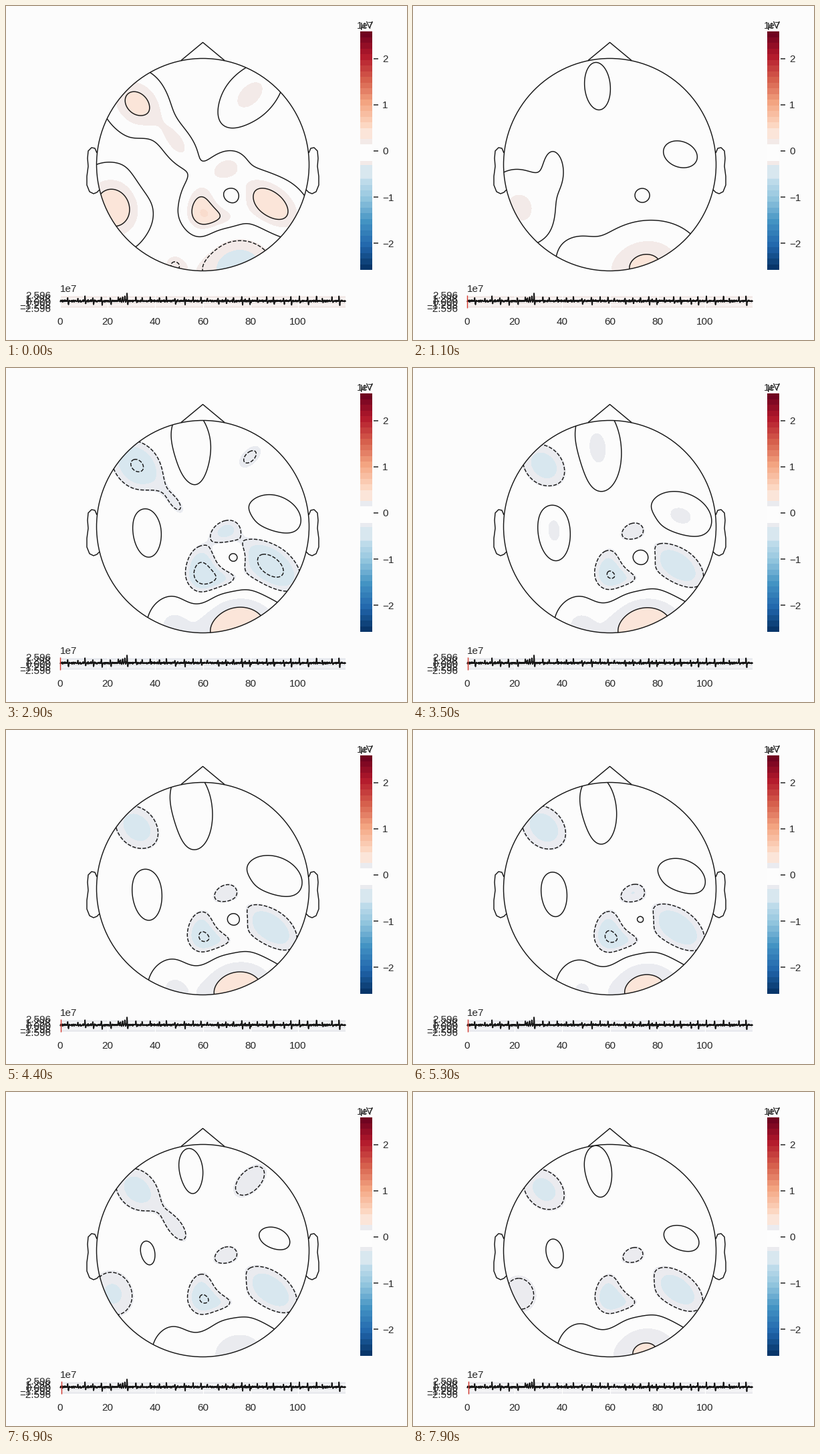
Animation, 600 px wide and 500 px high, one loop 8000 ms. Source, as a matplotlib script:

```python
import numpy as np
import matplotlib.pyplot as plt
from matplotlib.animation import FuncAnimation
from matplotlib.patches import Circle, Rectangle

plt.rcParams["font.family"] = "Liberation Sans"
plt.rcParams["lines.solid_capstyle"] = "butt"
FRAMES, INTERVAL = 80, 100
CENTER, RADIUS = (294.5, 237.5), 159
INK, LINE, PAPER = "#262626", "#161616", "#fcfcfc"
BLUE, PEACH = "#d8e7ef", "#fbe5d9"
WARM, COOL = np.array([243, 234, 232]) / 255, np.array([233, 235, 240]) / 255

# Strength of each activity pattern over time
TIMES = (0, 1100, 2300, 3500, 5300, 6900, 7900)
DRIVES = {
    "main": (0.45, 0, -0.58, -0.36, -0.38, -0.36, -0.34),
    "wide": (0.26, 0, -0.36, 0, 0, -0.23, -0.03),
    "left": (0.48, 0.25, 0, 0, 0, -0.28, -0.22),
    "back": (-0.33, 0.38, 0.52, 0.50, 0.42, 0.28, 0.36),
    "rest": (-0.10, 0.08, 0.10, 0.25, 0.14, 0.08, 0.09),
}
OFFSET = -0.05

# Each pattern is a sum of bumps: x, y, length, width, tilt in degrees, gain
SITES = {
    "main": [(196, 146, 44, 34, 45, 0.9), (292, 303, 36, 23, 90, 0.9),
             (319, 316, 34, 17, 5, 0.6), (396, 297, 52, 31, 40, 1.05),
             (328, 243, 26, 18, -25, 0.6)],
    "wide": [(255, 204, 36, 18, 55, 1), (365, 133, 48, 28, -45, 1)],
    "left": [(160, 302, 46, 40, 70, 1)],
    "back": [(347, 390, 62, 48, -12, 1), (248, 388, 36, 30, 90, 0.45)],
    "rest": [(276, 120, 52, 28, 85, 1), (211, 243, 36, 19, 85, 1),
             (400, 222, 38, 28, 20, 1), (343, 283, 14, 13, 0, 1.1)],
}
FILL_LEVELS = (-9, -0.6, -0.3, -0.2, 0.16, 0.28, 0.46, 9)
LINE_LEVELS = (-0.45, -0.22, 0, 0.28)

gx, gy = np.meshgrid(np.arange(132, 459, 2.0), np.arange(75, 402, 2.0))


def bump(x, y, length, width, tilt, gain):
    c, s = np.cos(np.radians(tilt)), np.sin(np.radians(tilt))
    u, v = (gx - x) * c + (gy - y) * s, (gy - y) * c - (gx - x) * s
    return gain * np.exp(-(u / length) ** 2 - (v / width) ** 2)


patterns = {name: sum(bump(*site) for site in sites) for name, sites in SITES.items()}

fig = plt.figure(figsize=(6, 5), dpi=100, facecolor=PAPER)
ax = fig.add_axes([0, 0, 1, 1])
ax.set(xlim=(0, 600), ylim=(500, 0))
ax.set_autoscale_on(False)
ax.axis("off")


def box(x, y, w, h, color, z=1):
    return ax.add_patch(Rectangle((x, y), w, h, fc=color, lw=0, zorder=z))


def label(x, y, s, ha="center", size=11):
    ax.text(x, y, s.replace("-", "\u2212"), ha=ha, va="center_baseline",
            fontsize=size, color=INK)


# Head
pen = dict(color=LINE, lw=1.05, zorder=6)
rim = ax.add_patch(Circle(CENTER, RADIUS, fill=False, ec=LINE, lw=1.05, zorder=6))
ax.plot([262, 294.5, 327], [81.5, 54.5, 81.5], **pen)
ear_x = np.array([136, 133, 128, 123, 122, 123, 121, 121, 125, 131, 136, 140])
ear_y = [220, 213, 212, 217, 228, 240, 255, 268, 278, 281, 279, 275]
ax.plot(ear_x, ear_y, **pen)
ax.plot(2 * CENTER[0] - ear_x, ear_y, **pen)

# Colour bar
STEPS, TOP, BOTTOM = 42, 38, 395
step = (BOTTOM - TOP) / STEPS
for i in range(STEPS):
    box(530, BOTTOM - (i + 1) * step, 18, step + 0.3, plt.cm.RdBu_r((i + 0.5) / STEPS))
box(530, 183, 18, 16, PEACH, 2)
box(530, 238, 18, 20, BLUE, 2)
box(530, 207, 18, 25, "#fdfdfd", 2)
tinted = [box(530, 199, 18, 8, PAPER, 2), box(530, 232, 18, 6, PAPER, 2),
          box(81, 433, 427, 19, PAPER)]
for v in range(-2, 3):
    y = 217 - 69.1 * v
    ax.plot([550, 557], [y, y], color=INK, lw=1.1)
    label(563, y, f"{v}", "left")
label(537.5, 28, "1e7")
label(539, 28, "\u00b5V", size=11)

# Timeline
for i in range(5):
    y = 433 + 4.75 * i
    ax.plot([81, 508], [y, y], color="white", lw=0.8, zorder=1.5)
    label(67, y, f"{2.596 - 1.298 * i:.3f}", "right")
for v in range(0, 101, 20):
    x = 81 + 3.56 * v
    ax.plot([x, x], [433, 452], color="white", lw=0.8, zorder=1.5)
    label(x, 471.5, f"{v}")
label(81, 422, "1e7", "left")

rng = np.random.default_rng(4)
tx = np.linspace(81, 508, 1700)
trace = 441.6 + rng.normal(0, 0.7, tx.size)
beats = np.arange(94, 505, 12.3) + rng.uniform(-2, 2, 34)
burst = np.linspace(168, 181, 5)
for x in (*beats, *burst):
    up, down = rng.uniform(4, 8), rng.uniform(1, 6)
    trace -= up * np.exp(-((tx - x) / 0.45) ** 2)
    trace += down * np.exp(-((tx - x - 1.2) / 0.45) ** 2)
ax.plot(tx, trace, color=LINE, lw=1.25, zorder=3)
marker, = ax.plot([81, 81], [433, 452], color="#d6392f", lw=1, zorder=4)

drawn = []


def update(n):
    while drawn:
        drawn.pop().remove()
    now = {name: np.interp(n * INTERVAL, TIMES, amps) for name, amps in DRIVES.items()}
    field = OFFSET + sum(now[name] * patterns[name] for name in patterns)
    gray = COOL + (WARM - COOL) * np.clip(1 + now["main"] / 0.4, 0, 1)
    for patch in tinted:
        patch.set_facecolor(gray)
    drawn.append(ax.contourf(gx, gy, field, FILL_LEVELS, zorder=2, colors=[
        "#c9dfeb", BLUE, gray, PAPER, gray, PEACH, "#f9dccd"]))
    levels = [v for v in LINE_LEVELS if field.min() < v < field.max()]
    drawn.append(ax.contour(gx, gy, field, levels, colors=LINE, linewidths=1.05, zorder=5,
                            linestyles=["--" if v < 0 else "-" for v in levels]))
    for art in drawn:
        art.set_clip_path(rim)
    marker.set_visible(n >= 5)
    x = 80.3 + (n + 22) // 27
    marker.set_xdata([x, x])
    return drawn


anim = FuncAnimation(fig, update, frames=FRAMES, interval=INTERVAL,
                     init_func=lambda: [], repeat=True, repeat_delay=0)
plt.show()
```
